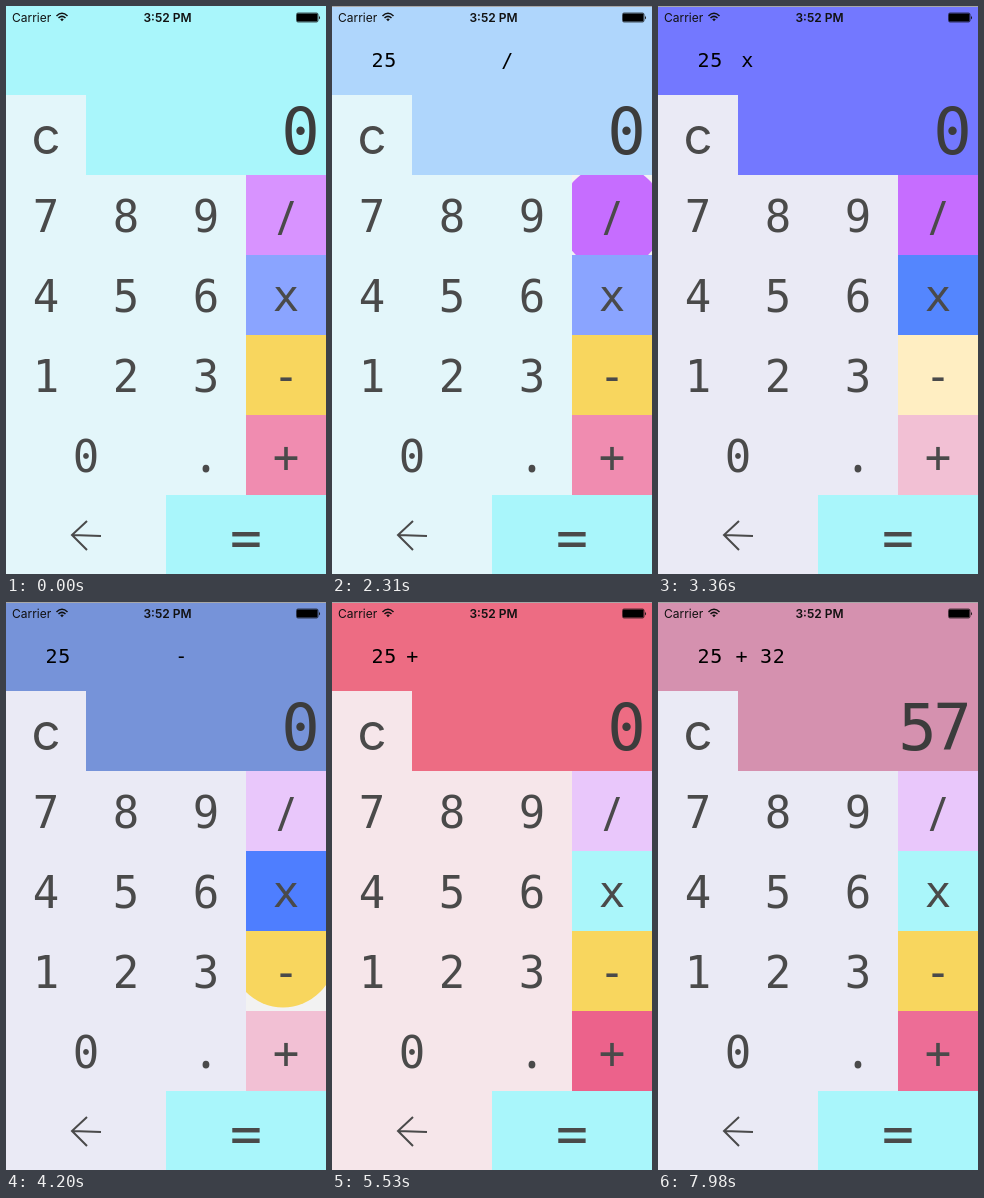
These frames come from a looping animation (320 by 568 pixels, 8 s). An HTML page:

```html
<!DOCTYPE html>
<html lang="en">
<head>
<meta charset="utf-8">
<title>Calculator</title>
<style>
  html, body { margin: 0; width: 100%; height: 100%; overflow: hidden; }
  #stage { display: block; width: 100%; height: 100%; }
  #stage svg { overflow: hidden; }
  text { fill: #4a4a4a; text-anchor: middle; white-space: pre; }
  .mono { font-family: "DejaVu Sans Mono", monospace; font-size: 44px; }
  .sans { font-family: "Open Sans", sans-serif; font-size: 47px; }
  .status text { font: 12px Inter, sans-serif; fill: #111; }
  .entry text { font: 20px "DejaVu Sans Mono", monospace; letter-spacing: .6px; text-anchor: start; fill: #000; }
  #display { font: 64px "DejaVu Sans Mono", monospace; letter-spacing: -3.5px; text-anchor: end; fill: #3c3c3c; }
</style>
</head>
<body>
<svg id="stage" viewBox="0 0 320 568">
  <rect id="panel" width="320" height="169"/>
  <g id="keys"></g>
  <path d="M81 515 66 529 81 544M66 529 95 530" fill="none" stroke="#4a4a4a" stroke-width="2"/>
  <g class="status">
    <text x="6" y="15.5" style="text-anchor:start">Carrier</text>
    <path d="M50.5 10Q56 4.5 61.5 10M52.5 12Q56 8.7 59.5 12" fill="none" stroke="#111" stroke-width="1.5"/>
    <path d="M54.2 13.3Q56 11.7 57.8 13.3L56 15.3Z" fill="#111"/>
    <text x="161.5" y="15.5" style="font-weight:600">3:52 PM</text>
    <rect x="290.5" y="7" width="21.5" height="9" rx="1.5" fill="none" stroke="#111" stroke-width=".7"/>
    <rect x="291" y="7.5" width="20.5" height="8" rx=".7" fill="#000"/>
    <path d="M313 9.5q1.8 2 0 4z" fill="#111"/>
  </g>
  <g class="entry">
    <text id="first" x="39.5" y="61"></text>
    <text id="operator" y="61"></text>
    <text id="second" x="102" y="61"></text>
  </g>
  <text id="display" x="310.25" y="148"></text>
  <rect id="edge" width="320" height="1" fill="#a8a8a8"/>
</svg>
<script>
const LOOP = 8000, RELEASE = 70, FADE = 450, DESELECT = 385;
const CYAN = '#a9f6fb';
const byId = id => document.getElementById(id);

// Panel colour and keypad tint for each mode.
const themes = {
  '=': [CYAN, '#e3f6fa'],
  '/': ['#c46cff', '#eaeaf5'],
  'x': ['#4e7eff', '#eaeaf5'],
  '-': ['#f8d65e', '#f4f0e2'],
  '+': ['#ec5d88', '#f6e6ea']
};
const tints = Object.values(themes).map(t => t[1]);

// Operator colours: idle, unselected, selected.
const operators = {
  '/': ['#d893ff', '#e9c7fb', '#c66dff'],
  'x': ['#8aa4ff', '#aaf6fa', '#4e7eff'],
  '-': ['#f8d65e', '#ffeec2', '#f8d65e'],
  '+': ['#f08cb0', '#f2c0d4', '#ec5d88']
};

// time, key, touch point in the key, first operand, operator, second operand, display
const presses = [
  [560, '2', 40, 44, '2', '', '', '2'],
  [1350, '5', 46, 52, '25', '', '', '25'],
  [2170, '/', 40, 42, '25', '/', '', '0'],
  [3080, 'x', 40, 42, '25', 'x', '', '0'],
  [4060, '-', 37, 24, '25', '-', '', '0'],
  [5180, '+', 40, 40, '25', '+', '', '0'],
  [6160, '3', 40, 44, '25', '+', '3', '3'],
  [6860, '2', 40, 44, '25', '+', '32', '32'],
  [7805, '=', 80, 40, '25', '+', '32', '57']
].map(([time, key, x, y, ...texts]) => ({ time, key, x, y, texts }));
const modeChanges = presses.filter(p => themes[p.key]);

const clamp = p => Math.max(0, Math.min(1, p));
const smooth = p => (p = clamp(p), p * p * (3 - 2 * p));
const easeOut = p => 1 - (1 - clamp(p)) ** 1.65;
const rgb = hex => [1, 3, 5].map(i => parseInt(hex.slice(i, i + 2), 16));
const blend = (a, b, p) => rgb(a).map((v, i) => v + (rgb(b)[i] - v) * p);
const css = c => `rgb(${c.map(Math.round)})`;
const nearest = (c, palette) => {
  const gap = hex => Math.hypot(...rgb(hex).map((v, i) => v - c[i]));
  return palette.reduce((a, b) => gap(b) < gap(a) ? b : a);
};

function add(parent, tag, attrs, text = '') {
  const node = document.createElementNS('http://www.w3.org/2000/svg', tag);
  for (const name in attrs) node.setAttribute(name, attrs[name]);
  node.textContent = text;
  return parent.appendChild(node);
}

const keys = {};
function addKey(label, x, y, { baseline = 57, style = '', kind = 'mono', width = 80 } = {}) {
  const box = add(byId('keys'), 'svg', { x, y, width, height: 80 });
  const face = add(box, 'rect', { width, height: 80 });
  const ripple = add(box, 'g', {});
  add(ripple, 'rect', { width, height: 80, fill: '#f2f2f2' });
  const fill = operators[label] ? operators[label][2] : CYAN;
  const circle = add(ripple, 'circle', { fill });
  add(box, 'text', { x: width / 2, y: baseline, class: kind, style }, label);
  keys[label] = { face, ripple, circle, width };
}

addKey('c', 0, 89, { baseline: 59, style: 'font:51px Inter,sans-serif' });
['789', '456', '123'].forEach((row, r) =>
  [...row].forEach((digit, c) => addKey(digit, c * 80, 169 + r * 80)));
addKey('0', 0, 409, { width: 160 });
addKey('.', 160, 409, { kind: 'sans', style: 'font-size:58px' });
addKey('', 0, 489, { width: 160 });
addKey('/', 240, 169, { kind: 'sans', baseline: 60 });
addKey('x', 240, 249, { baseline: 56 });
addKey('-', 240, 329, { baseline: 56 });
addKey('+', 240, 409);
addKey('=', 160, 489, { baseline: 60.5, style: 'font-size:53px', width: 160 });

function operatorColour(key, from, to, age, p) {
  const look = mode => operators[key][mode === '=' ? 0 : mode === key ? 2 : 1];
  if (key === '-' && to === '=') return look(to);
  if (key === to || (key === from && to === '=')) return css(blend(look(from), look(to), p));
  return look(age < DESELECT ? from : to);
}

function drawKeys(t) {
  const past = modeChanges.filter(m => m.time <= t);
  const last = past.at(-1) || { time: -LOOP, key: '=' };
  const from = past.at(-2)?.key || '=', to = last.key;
  const age = t - last.time, p = smooth(age / FADE);
  byId('panel').style.fill = css(blend(themes[from][0], themes[to][0], p));
  const tint = nearest(blend(themes[from][1], themes[to][1], p), tints);
  for (const key in keys) {
    keys[key].face.style.fill = operators[key] ? operatorColour(key, from, to, age, p)
      : key === '=' ? CYAN : tint;
    keys[key].ripple.style.opacity = 0;
  }
}

function drawRipple(press, t) {
  const age = t - press.time;
  if (age < 0 || age > 630) return;
  const { ripple, circle, width } = keys[press.key];
  ripple.style.opacity = clamp((age + 20) / 90) * (1 - smooth((age - 140) / 460));
  circle.setAttribute('cx', press.x);
  circle.setAttribute('cy', press.y);
  circle.setAttribute('r', width * (.5 + .5 * easeOut(age / 700)));
}

function drawTexts(t) {
  const done = presses.filter(p => p.time + RELEASE <= t).at(-1);
  const [first, operator, second, display] = done ? done.texts : ['', '', '', '0'];
  Object.entries({ first, operator, second, display }).forEach(([id, text]) => {
    byId(id).textContent = text;
  });
  // A new operator springs in from the right.
  const chosen = modeChanges.filter(m => m.key !== '=' && m.time <= t).at(-1);
  const age = chosen ? (t - chosen.time) / 1000 : 9;
  const offset = 428 * Math.exp(-9 * age) * Math.cos(5 * age);
  byId('operator').setAttribute('x', 77.5 + offset);
}

const start = performance.now();
function draw(now) {
  const t = Math.max(0, now - start) % LOOP;
  drawKeys(t);
  presses.forEach(press => drawRipple(press, t));
  drawTexts(t);
  byId('edge').style.opacity = t < presses[0].time ? 0 : 1;
  requestAnimationFrame(draw);
}
draw(start);
</script>
</body>
</html>
```
